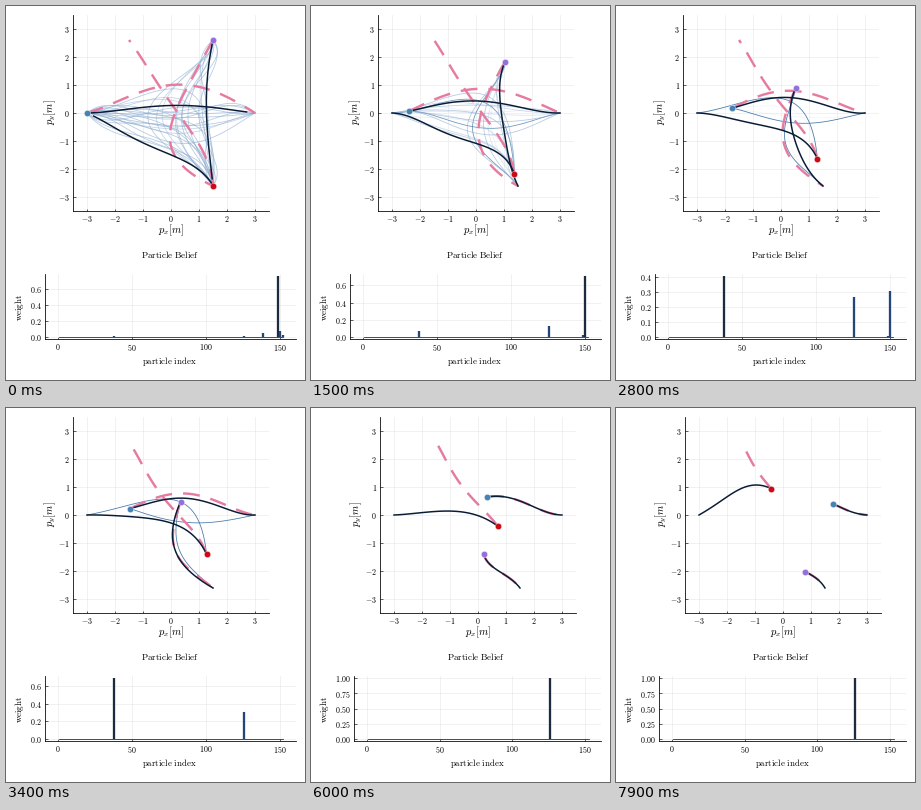
Animation of 299x374 px, one loop 8000 ms. Source, as a matplotlib script:

```python
import matplotlib.pyplot as plt
import numpy as np
from matplotlib.animation import FuncAnimation

W, H, DPI = 299, 374, 72
UNIT = 28          # pixels per metre in the upper plot
FRAMES, STEP = 80, 100

plt.rcParams.update({
    "font.family": "DejaVu Serif",
    "mathtext.fontset": "cm",
    "font.size": 8,
    "axes.linewidth": 0.8,
    "xtick.major.width": 0.6,
    "ytick.major.width": 0.6,
})

COLORS = ["#4682b4", "#9370db", "#cc0a14"]
INK, PINK, THIN, FAINT = "#0a1c35", "#e67a9f", "#3f73a8", "#86a8cf"

# Agent positions and goals, in pixels from the plot centre
KEYS = [0, 800, 2200, 3400, 4800, 6000, 7900]
SPOTS = [
    [(-84, 0), (-77, .5), (-56, 3.5), (-41, 6.5), (-18, 13), (9, 18), (50, 11)],
    [(42, 73), (36.5, 64), (21, 37), (9.5, 13), (2, -18.5), (5.5, -39),
     (22, -56.5)],
    [(42, -72.5), (40, -68), (37, -52.5), (35.5, -39), (31, -26.5),
     (19.5, -11), (-12, 26.5)],
]
GOALS = np.array([(84, 0), (42, -73), (-84, 0)])
PLAN_GOALS = np.array([(84, 0), (42, -73), (-42, 73)])

# How far a path bows from its chord at one, two and three quarters
BENDS = [
    [(4, 7.5, 5.5), (6.5, 10, 6), (10, 11, 3.7), (10, 12.7, 5.4),
     (8.7, 10, 2.8), (4.4, 3, -.3), (-.9, -1.7, -1.5)],
    [(-5.5, -6.5, -4), (-9.6, -11, -7), (-8, -7, -6.3), (-17, -22, -15.5),
     (-9.7, -10.5, -4), (-3.2, -1.7, .3), (1.2, 1.9, 1.6)],
    [(-7, -3, -1), (-12.5, -8.4, -6), (-10.5, -6, -4), (-17.5, -16.5, -9.3),
     (-12.7, -12.3, -6.8), (-9.3, -9.5, -5), (-10, -8.7, -4)],
]
PLAN_KEYS = [0, 2200, 4800, 6000, 7900]
PLANS = [
    [(16.5, 28, 22), (16.5, 21, 13), (9.5, 11.5, 4.5)] + BENDS[0][5:],
    [(-20, -38, -41), (-20, -30, -24), (-9.7, -11, -4.5)] + BENDS[1][5:],
    [(-8.5, -5.5, -2.6), (-4.5, -1, .5), (2, 6.5, 4.5), (2.5, 5, 3.5),
     (1.5, 2, 1)],
]
RIVAL_KEYS = [0, 3400]
RIVALS = [
    [(-8, -20, -14), (-8, -11, -7.6)],
    [(-28, -56, -38), (-13.5, -18, -12)],
    [(-45, -58, -32), (-39, -37, -19)],
]

# Particle weights; the light ones only flicker at the start
WEIGHT_KEYS = [0, 800, 2200, 3400, 4350]
HEAVY = {
    149: [.76, .04, .01, 0, 0],
    150.5: [.08, .81, .61, 0, 0],
    38: [.01, .015, .12, .69, 0],
    126: [.02, .03, .22, .31, 1],
}
LIGHT = {4: .008, 34: .008, 80: .008, 114: .006, 139: .05, 152: .03}


def glide(times, rows):
    """Smooth interpolation of rows over time, held outside the range."""
    times, v = np.array(times, float), np.array(rows, float)
    m = np.gradient(v, times, axis=0)

    def at(t):
        k = min(np.searchsorted(times, t, side="right"), len(times) - 1) - 1
        h = times[k + 1] - times[k]
        u = np.clip((t - times[k]) / h, 0, 1)
        a = u * u * (3 - 2 * u)
        return (v[k] * (1 - a) + v[k + 1] * a
                + h * u * (1 - u) * ((1 - u) * m[k] - u * m[k + 1]))
    return at


spots = [glide(KEYS, r) for r in SPOTS]
bends = [glide(KEYS, r) for r in BENDS]
plan_bends = [glide(PLAN_KEYS, r) for r in PLANS]
rival_bends = [glide(RIVAL_KEYS, r) for r in RIVALS]

FIT = np.linalg.inv(np.vander(np.linspace(0, 1, 5), 5))


def curve(start, goal, bend, reach=1.0):
    """Quartic bow over the chord from start to goal."""
    u = np.linspace(0, reach, 60)
    chord = goal - start
    normal = np.array([-chord[1], chord[0]]) / np.hypot(*chord)
    bow = np.vander(u, 5) @ FIT @ np.concatenate([[0], bend, [0]])
    return (start + np.outer(u, chord) + np.outer(bow, normal)).T


def box(left, top, right, bottom):
    return [left / W, 1 - bottom / H, (right - left) / W, (bottom - top) / H]


def rm(text):
    return r"$\mathrm{%s}$" % text.replace(" ", r"\ ")


fig = plt.figure(figsize=(W / DPI, H / DPI), dpi=DPI, facecolor="white")
top = fig.add_axes(box(67, 9, 263, 205))
low = fig.add_axes(box(39, 268, 290, 333))
for ax in (top, low):
    ax.spines[["top", "right"]].set_visible(False)
    ax.set_axisbelow(True)
    ax.grid(color="#e8e8e8", lw=0.6)
    ax.tick_params(direction="in", length=2.5, pad=3)

marks = range(-3, 4)
names = [rm(str(k)) for k in marks]
edge = 3.5 * UNIT
top.set(xlim=(-edge, edge), ylim=(-edge, edge))
top.set_xticks([k * UNIT for k in marks], names)
top.set_yticks([k * UNIT for k in marks], names)
low.set_xlim(-8.8, 161)
low.set_xticks(range(0, 151, 50), [rm(str(k)) for k in range(0, 151, 50)])


def label(x, y, text, size, shift, rotation=0):
    """A centred text with its x and its shift in the wide layout."""
    art = fig.text(x / W, 1 - y / H, text, size=size, rotation=rotation,
                   ha="center", va="center")
    return art, x, shift


labels = [
    label(165, 224, "$p_x[m]$", 10.5, 2),
    label(44, 106, "$p_y[m]$", 10.5, 1.5, 90),
    label(164, 249, rm("Particle Belief"), 9, 1),
    label(163, 355, rm("particle index"), 8.9, 3),
    label(13, 301, rm("weight"), 9, 0, 90),
]

rng = np.random.default_rng(5)
GHOSTS = 11
mix = rng.uniform(0, 1.15, GHOSTS)
wobble = rng.normal(0, 4, (GHOSTS, 3, 3))
mix[0], wobble[0] = 1, 0
life = 700 + 230 * np.arange(GHOSTS)

ghosts = [[top.plot([], [], color=FAINT if g else THIN, lw=0.8, zorder=2)[0]
           for _ in range(3)] for g in range(GHOSTS)]
plans = [top.plot([], [], color=PINK, lw=2.4, ls=(0, (7, 4.6)),
                  dash_capstyle="butt", zorder=3)[0] for _ in range(3)]
paths = [top.plot([], [], color=INK, lw=1.5, zorder=4)[0] for _ in range(3)]
dots = [top.plot([], [], "o", ms=6.4, color=c, mec="white", mew=0.4,
                 zorder=5)[0] for c in COLORS]

low.plot([0.7, 152.5], [0, 0], color="#1c2733", lw=0.8)
bars = {k: low.plot([k, k], [0, 0], lw=2.3, solid_capstyle="butt")[0]
        for k in [*HEAVY, *LIGHT]}


def ghost_alpha(g, t):
    if g == 0:
        return (0.3 + 0.65 * min(t / 2200, 1)) * np.clip((4100 - t) / 600, 0, 1)
    return 0.6 * np.clip((life[g] - t) / 1200, 0, 1)


def draw_belief(t):
    w = {k: np.interp(t, WEIGHT_KEYS, v) for k, v in HEAVY.items()}
    w.update({k: v * max(0, 1 - t / 800) for k, v in LIGHT.items()})
    peak = max(w.values())
    for k, bar in bars.items():
        bar.set_ydata([0, w[k]])
        bar.set_visible(w[k] > 0.002)
        bar.set_color("#1b2c3f" if w[k] == peak else "#24457a")
    wide = peak > 0.88
    step = 0.25 if wide else 0.1 if peak < 0.65 else 0.2
    ticks = np.arange(0, 1.03 * peak, step)
    low.set_ylim(-0.03 * peak, 1.03 * peak)
    low.set_yticks(ticks, [rm(f"{v:.{1 + wide}f}") for v in ticks])
    return wide


def update(i):
    t = i * STEP
    wide = bool(draw_belief(t))
    top.set_position(box(67 + 2 * wide, 9, 263 + 2 * wide, 205))
    low.set_position(box(39 + 4 * wide, 268, 290, 333))
    for art, x, shift in labels:
        art.set_x((x + shift * wide) / W)

    settle = max(0.2, 1 - t / 2800)
    for a in range(3):
        spot, bend, rival = spots[a](t), bends[a](t), rival_bends[a](t)
        dots[a].set_data([spot[0]], [spot[1]])
        paths[a].set_data(*curve(spot, GOALS[a], bend,
                                 min(1, 0.95 + t / 16000)))
        plans[a].set_data(*curve(spot, PLAN_GOALS[a], plan_bends[a](t)))
        for g in range(GHOSTS):
            alpha = float(ghost_alpha(g, t))
            line = ghosts[g][a]
            line.set_visible(alpha > 0.01)
            line.set_alpha(alpha)
            bow = bend + mix[g] * (rival - bend) + settle * wobble[g, a]
            line.set_data(*curve(spot, GOALS[a], bow))
    return []


anim = FuncAnimation(fig, update, frames=FRAMES, interval=STEP,
                     init_func=lambda: update(0), repeat=True, repeat_delay=0)
plt.show()
```
